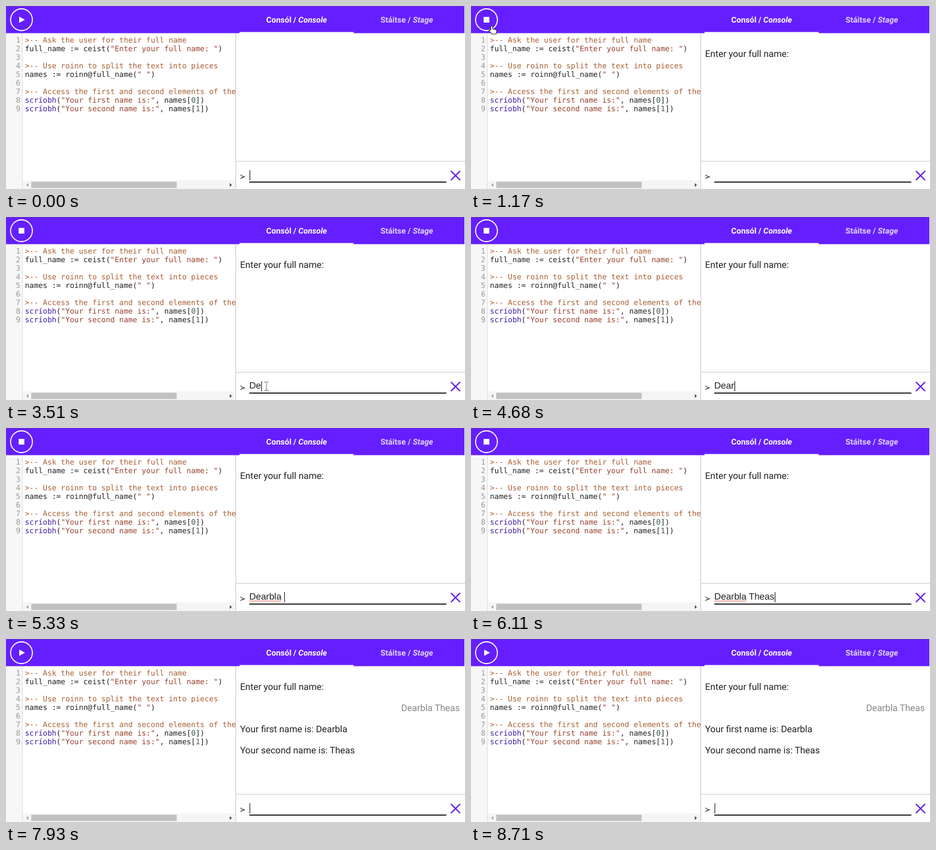
Write an HTML page that moves like this. It is 800x320 px and loops after 8.84 s.

```html
<!DOCTYPE html>
<html lang="en">
<head>
<meta charset="utf-8">
<title>Console demo</title>
<style>
  html, body { margin: 0; width: 100%; height: 100%; overflow: hidden; background: #fff; }
  svg { display: block; width: 800px; height: 320px; }
  text { white-space: pre; text-rendering: geometricPrecision; }
  .code { font: 13px "DejaVu Sans Mono", monospace; fill: #222; }
  .comment { fill: #a75f33; }
  .string { fill: #97402c; }
  .builtin { fill: #3d1ba6; }
  .number { fill: #3f5a4c; }
  .gutter { fill: #999; text-anchor: end; }
  .tab { font: 600 14px Roboto, sans-serif; fill: #fff; text-anchor: middle; }
  .tab tspan { font-style: italic; }
  .out { font: 16px Roboto, sans-serif; fill: #212121; }
  .echo { fill: #858585; text-anchor: end; }
  #typed { font: 16px "Liberation Sans", Arial, sans-serif; fill: #212121; }
</style>
</head>
<body>
<svg viewBox="0 0 800 320">
  <defs>
    <pattern id="squiggle" x="424" y="301" width="4" height="3" patternUnits="userSpaceOnUse">
      <path d="M0 2.3L2 .7L4 2.3" fill="none" stroke="#e8584f"/>
    </pattern>
  </defs>

  <rect width="800" height="320" fill="#fff"/>
  <rect y="47" width="28" height="273" fill="#f7f7f7"/>
  <rect x="28" y="47" width="1" height="273" fill="#ddd"/>
  <g id="numbers" class="code gutter"></g>
  <g class="code">
    <text x="33" y="64" class="comment">&gt;-- Ask the user for their full name</text>
    <text x="33" y="79">full_name := ceist(<tspan class="string">"Enter your full name: "</tspan>)</text>
    <text x="33" y="109" class="comment">&gt;-- Use roinn to split the text into pieces</text>
    <text x="33" y="124">names := roinn@full_name(<tspan class="string">" "</tspan>)</text>
    <text x="33" y="154" class="comment">&gt;-- Access the first and second elements of the</text>
    <text x="33" y="169"><tspan class="builtin">scríobh</tspan>(<tspan class="string">"Your first name is:"</tspan>, names[<tspan class="number">0</tspan>])</text>
    <text x="33" y="184"><tspan class="builtin">scríobh</tspan>(<tspan class="string">"Your second name is:"</tspan>, names[<tspan class="number">1</tspan>])</text>
  </g>

  <rect x="29" y="305" width="371" height="15" fill="#f5f5f5"/>
  <rect x="44" y="307.3" width="253.5" height="11" fill="#c1c1c1"/>
  <path d="M39 309.8v6.4l-3.8-3.2z" fill="#a3a3a3"/>
  <path d="M390 309.8v6.4l3.8-3.2z" fill="#505050"/>

  <rect x="400" y="47" width="400" height="273" fill="#fff"/>
  <rect x="400" y="47" width="1" height="273" fill="#c4c4c4"/>
  <rect x="401" y="271" width="399" height="1" fill="#c8c8c8"/>

  <rect width="799" height="47.5" fill="#651fff"/>
  <rect width="799" height="1" fill="#5a35c0"/>
  <rect x="407" y="45.5" width="199" height="2.5" fill="#fff"/>
  <text x="506.5" y="29" class="tab">Consól / <tspan>Console</tspan></text>
  <text x="698.5" y="29" class="tab" opacity=".8">Stáitse / <tspan>Stage</tspan></text>
  <circle cx="27" cy="24" r="19" fill="none" stroke="#fff" stroke-width="1.8"/>
  <path id="play" d="M23 18.6v10.8l10-5.4z" fill="#fff"/>
  <rect id="stop" x="22" y="19" width="10" height="10" fill="#fff"/>

  <text id="question" x="408" y="89" class="out">Enter your full name:</text>
  <g id="answers" class="out">
    <text id="echo" x="791" y="126" class="echo"></text>
    <text id="first" x="408" y="163"></text>
    <text id="second" x="408" y="200"></text>
  </g>

  <path d="M408.8 295Q411 298 416.2 298.6Q411 299.2 408.8 302.2" fill="none" stroke="#222" stroke-width="1.2"/>
  <rect x="424" y="307" width="343.5" height="1.7" fill="#000"/>
  <path d="M775.5 288.5l16 16m0-16l-16 16" stroke="#5f20ea" stroke-width="2.3"/>
  <text id="typed" x="424" y="300"></text>
  <rect id="misspelt" x="424" y="301" height="3" fill="url(#squiggle)"/>
  <rect id="caret" y="287" width="1.2" height="18" fill="#222"/>

  <path id="hand" d="M-1.7 1.2Q0-1.6 1.7 1.2V5L7 6.2Q9.2 6.8 9 9L7.8 14H.2L-4.6 8.2Q-4.6 6-1.7 7.6Z" fill="#fff" stroke="#222" stroke-width="1.1" stroke-linejoin="round"/>
  <path id="beam" d="M-4-7.5h2.5q1.5 0 1.5 1.5q0-1.5 1.5-1.5h2.5M0-6V6M-4 7.5h2.5q1.5 0 1.5-1.5q0 1.5 1.5 1.5h2.5" fill="none" stroke="#777" stroke-width="1.1"/>
</svg>
<script>
  const LOOP = 8840, STEP = 130, BLINK = 585;
  const RUN = 1040, FOCUS = 2470, ENTER = 6240;
  const FIRST = "Dearbla", SECOND = "Theas", NAME = `${FIRST} ${SECOND}`;
  const keyTimes = [3120, 3510, 4550, 4680, 4810, 4940, 5070, 5330, 5460, 5590, 5720, 5980, 6110];
  const pointer = { show: 910, leave: 1170, arrive: 2080, hide: 4550, from: [36, 35], to: [454, 296] };

  const $ = id => document.getElementById(id);
  const show = (id, on) => $(id).setAttribute("visibility", on ? "visible" : "hidden");

  $("numbers").innerHTML = Array.from({ length: 9 }, (_, i) =>
    `<text x="25" y="${64 + 15 * i}">${i + 1}</text>`).join("");
  $("echo").textContent = NAME;
  $("first").textContent = `Your first name is: ${FIRST}`;
  $("second").textContent = `Your second name is: ${SECOND}`;

  const ruler = document.createElement("canvas").getContext("2d");
  ruler.font = '16px "Liberation Sans", Arial, sans-serif';
  const widthOf = s => ruler.measureText(s).width;

  // Each key press restarts the blink; the last one carries over into the next loop.
  function caretOn(t) {
    if (t >= RUN && t < FOCUS) return false;
    const last = [ENTER - LOOP, FOCUS, ...keyTimes, ENTER].filter(k => k <= t).pop();
    return (t - last) % (2 * BLINK) < BLINK;
  }

  function drawPointer(t) {
    const { show: start, leave, arrive, hide, from, to } = pointer;
    const p = Math.min(1, Math.max(0, (t - leave) / (arrive - leave)));
    const ease = p * p * (3 - 2 * p);
    const [x, y] = from.map((v, i) => v + (to[i] - v) * ease);
    const visible = t >= start && t < hide, onButton = y < 48;
    for (const id of ["hand", "beam"]) $(id).setAttribute("transform", `translate(${x} ${y})`);
    show("hand", visible && onButton);
    show("beam", visible && !onButton);
  }

  function draw(now) {
    const t = Math.floor(now % LOOP / STEP) * STEP;
    const running = t >= RUN && t < ENTER;
    show("play", !running);
    show("stop", running);
    show("question", t >= RUN);
    show("answers", t >= ENTER);

    const typed = t < ENTER ? NAME.slice(0, keyTimes.filter(k => k <= t).length) : "";
    $("typed").textContent = typed;
    $("misspelt").setAttribute("width", typed.length > FIRST.length ? widthOf(FIRST) : 0);
    $("caret").setAttribute("x", 424.4 + widthOf(typed));
    show("caret", caretOn(t));
    drawPointer(t);
  }

  const begin = performance.now();
  function tick() {
    draw(performance.now() - begin);
    requestAnimationFrame(tick);
  }
  tick();
</script>
</body>
</html>
```
